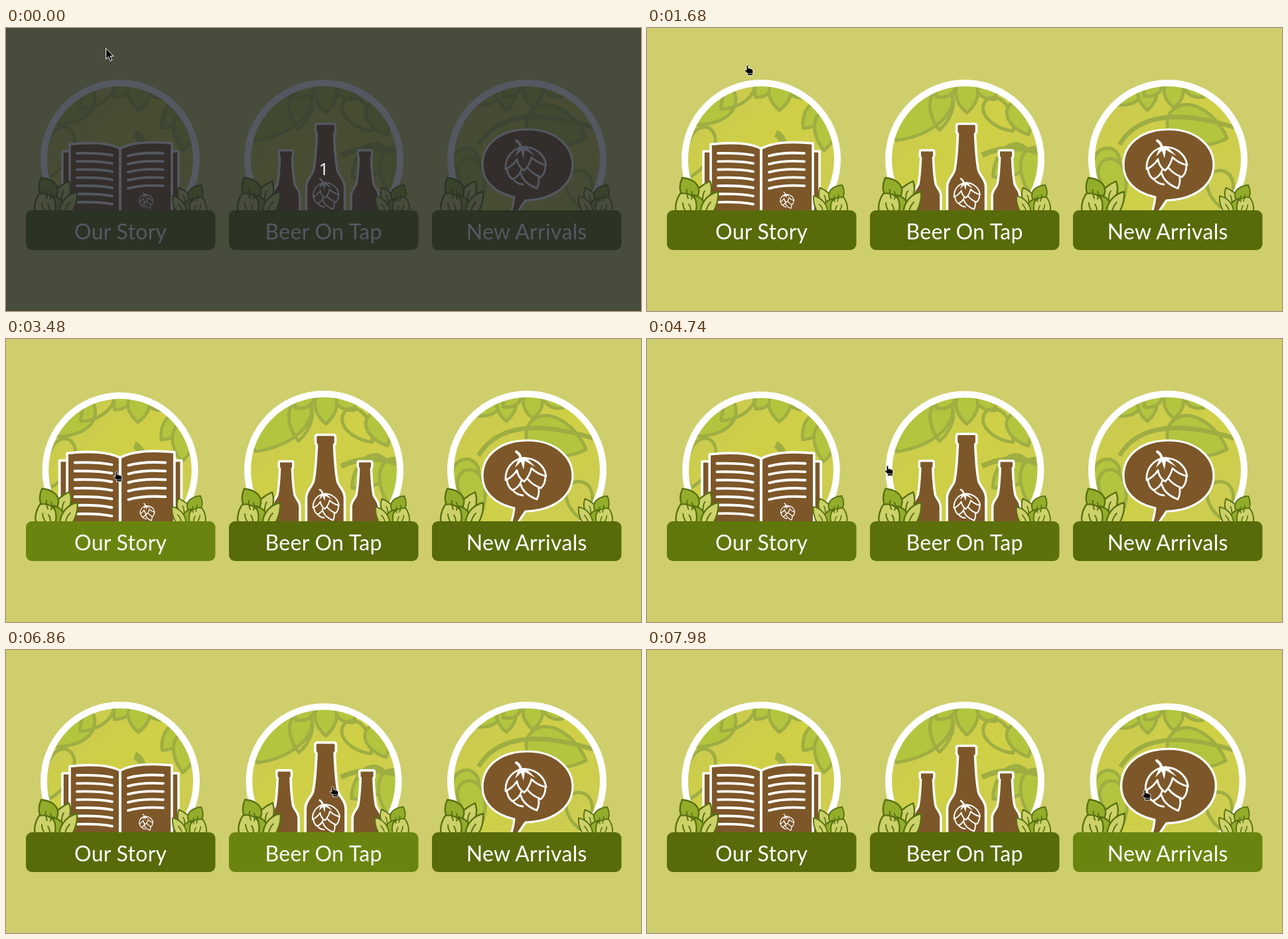
These frames come from a looping animation (957x427 px, 8000 ms). An HTML page:

```html
<!DOCTYPE html>
<html lang="en">
<head>
<meta charset="utf-8">
<title>Brewery cards</title>
<style>
@property --h { syntax: "<number>"; inherits: true; initial-value: 0; }
html, body { margin: 0; width: 100%; height: 100%; overflow: hidden; background: #cfce6c; }
svg { display: block; width: 100vw; height: 100vh; }

.card { --h: 0; animation: 8s linear infinite; }
#c0 { animation-name: first; }
#c1 { animation-name: second; }
#c2 { animation-name: third; }
.ring { transform: scale(calc(1 - .0208 * var(--h))); }
.hops { transform: scale(calc(1 - .01 * var(--h))); }
.icon { transform: scale(calc(1 + .05 * var(--h))); }
.button { fill: color-mix(in srgb, #6a850f calc(var(--h) * 100%), #576b0a); }
.label { font: 32px Lato, "Open Sans", sans-serif; letter-spacing: .3px; fill: #fff; text-anchor: middle; }
.count { font: 26px "Open Sans", "Noto Sans", sans-serif; fill: #fff; text-anchor: middle; }
.brown { fill: #7d5729; stroke: #fff; stroke-width: 3.6; stroke-linejoin: round; }
.line { fill: none; stroke: #fff; stroke-linecap: round; stroke-linejoin: round; }
.faint { fill: none; stroke: #9fae42; stroke-width: 5; stroke-linejoin: round; }
.faint .fill { fill: #b3c53e; }
.leaf { stroke: #587112; stroke-width: 2.4; stroke-linejoin: round; }
.vein { fill: none; stroke: #587112; stroke-width: 2; stroke-linecap: round; }
.light { fill: #cdd169; }
.mid { fill: #93ad2b; }

.intro { animation: intro 8s step-end infinite; }
.arrow { animation: arrow 8s step-end infinite; }
.hand { animation: hand 8s step-end infinite; }
.cursor { animation: move 8s step-end infinite; }

@keyframes first {
  0%, 22.5% { --h: 0; animation-timing-function: ease; }
  29.25% { --h: 1; }
  57.25% { --h: 1; animation-timing-function: ease; }
  63.75%, 100% { --h: 0; }
}
@keyframes second {
  0%, 58.125% { --h: 0; animation-timing-function: ease; }
  64.5% { --h: 1; }
  91% { --h: 1; animation-timing-function: ease; }
  97.5%, 100% { --h: 0; }
}
@keyframes third {
  0%, 91.75% { --h: 0; animation-timing-function: ease; }
  98.25%, 100% { --h: 1; }
}
@keyframes intro { 0% { visibility: visible; } .25%, 100% { visibility: hidden; } }
@keyframes arrow { 0% { visibility: visible; } 19.5%, 100% { visibility: hidden; } }
@keyframes hand { 0% { visibility: hidden; } 19.5%, 100% { visibility: visible; } }
@keyframes move {
  0% { transform: translate(150px, 30px); }
  14% { transform: translate(150px, 33px); }
  17.75% { transform: translate(150px, 55px); }
  19.5% { transform: translate(146px, 55px); }
  22.5% { transform: translate(146px, 72px); }
  26% { transform: translate(148px, 116px); }
  29.5% { transform: translate(150px, 162px); }
  33% { transform: translate(160px, 189px); }
  36.5% { transform: translate(158px, 200px); }
  40% { transform: translate(161px, 200px); }
  43.5% { transform: translate(161px, 199px); }
  47% { transform: translate(205px, 192px); }
  50.5% { transform: translate(249px, 190px); }
  54% { transform: translate(295px, 190px); }
  57.75% { transform: translate(357px, 190px); }
  61% { transform: translate(397px, 193px); }
  64.75% { transform: translate(409px, 197px); }
  68.25% { transform: translate(421px, 200px); }
  71.75% { transform: translate(422px, 202px); }
  85.75% { transform: translate(487px, 205px); }
  89.25% { transform: translate(555px, 206px); }
  91% { transform: translate(650px, 207px); }
  94.5% { transform: translate(705px, 209px); }
  98% { transform: translate(740px, 210px); }
  99.75%, 100% { transform: translate(745px, 210px); }
}
</style>
</head>
<body>
<svg viewBox="0 0 957 427" preserveAspectRatio="none">
  <defs>
    <clipPath id="top"><path d="M0,0H957V276H0Z"/></clipPath>
    <linearGradient id="field" x1="0" y1="0" x2=".7" y2=".8">
      <stop offset="0" stop-color="#c8c955"/>
      <stop offset=".6" stop-color="#cfd045"/>
      <stop offset="1" stop-color="#cdcd50"/>
    </linearGradient>

    <g id="hop" class="line">
      <path stroke-width="4" d="M-14,-36Q-8,-32 -7,-26"/>
      <path fill="#fff" stroke="none" d="M-10,-27L-16,-12L-7,-21L-3,-9L-1,-22L15,-13L0,-28Z"/>
      <path d="M-7,-26C-21,-22 -31,-10 -30,7Q-19,2 -13,-8
        M-7,-26C12,-29 29,-16 31,1Q18,-2 9,-11
        M-13,-8Q-11,4 -2,9Q6,1 9,-11
        M-28,7Q-27,17 -20,22Q-9,18 -6,7
        M30,1Q30,13 23,19Q10,14 3,5
        M-19,22Q-14,29 -4,30
        M-7,14Q-3,28 17,36Q22,26 19,17"/>
    </g>

    <g id="bunch">
      <path class="leaf light" d="M95,231C99,242 98,252 90,262H76C72,254 74,246 79,241Q86,235 95,231Z"/>
      <path class="leaf mid" d="M53,226C67,227 80,235 78,248C77,257 68,262 58,258C48,250 48,237 53,226Z"/>
      <path class="leaf light" d="M50,250C63,247 75,256 77,268L76,282H46L43,273Q43,260 50,250Z"/>
      <path class="leaf mid" d="M70,252Q86,256 88,270L84,282H72Q78,266 70,252Z"/>
      <path class="leaf light" d="M107,247C108,260 104,272 97,282H81C79,266 90,251 107,247Z"/>
      <path class="vein" d="M62,257Q59,250 60,244M67,258Q69,252 67,247M84,258Q84,250 87,246M58,276Q54,270 54,264M66,276Q66,270 63,266M89,276Q91,268 96,263"/>
    </g>

    <path id="bottle" d="M-12,144.5H12Q15,144.5 15,148V157L13,160C14,185 15,200 18,215C21,224 29,228 29,240V284H-29V240C-29,228 -21,224 -18,215C-15,200 -14,185 -13,160L-15,157V148Q-15,144.5 -12,144.5Z"/>
  </defs>

  <g id="cards"></g>

  <g class="intro">
    <path d="M0,0H957V427H0Z" fill="rgb(27,33,45)" fill-opacity=".75"/>
    <text class="count" x="479" y="222">1</text>
  </g>

  <g class="cursor">
    <path class="arrow" d="M.6,.8V17L4.4,13.4L7.2,19.6L9.9,18.4L7.2,12.4H12Z" fill="#000" stroke="#fff"/>
    <g class="hand">
      <path d="M4,2Q5.4,.2 6.8,2V6Q8.6,5.2 9.6,6.4Q11.4,5.8 12,7.2Q14,7.2 13.8,9.2V13L12.8,16.4H5.4V13.4L1,9.4Q.8,7.4 3,8L4,8.8Z" fill="#000" stroke="#fff" stroke-width=".9"/>
      <path d="M5.6,13.6H12.8" fill="none" stroke="#fff" stroke-width=".7"/>
    </g>
  </g>
</svg>

<script>
const useHop = (x, y, s, w) =>
  `<use href="#hop" transform="translate(${x} ${y}) scale(${s})" stroke-width="${w}"/>`;

// A pointed hop bract hanging from (x, y), turned by deg
const leaf = (x, y, len, w, deg, cls = "fill") =>
  `<path class="${cls}" transform="translate(${x} ${y}) rotate(${deg})"
    d="M0,0C${-w * 1.4},${len * .05} ${-w * 1.2},${len * .65} 0,${len}C${w * 1.2},${len * .65} ${w * 1.4},${len * .05} 0,0"/>`;

function book() {
  let lines = "";
  for (let i = 0; i < 7; i++) {
    const y = 189 + i * 12.3;
    lines += `M107,${y}Q140,${y - 1} 160,${y + 3}`;
    if (i < 5) lines += `M184,${y + 4}Q205,${y - 2} 237,${y}`;
  }
  return `<path class="brown" d="M85,186H260V284H85Z"/>
    <path class="brown" d="M96,175.5C125,172 155,173 172,182C190,172 220,171 250,174V284H96Z"/>
    <path class="line" stroke-width="4" d="M172,183V280"/>
    <path class="line" stroke-width="3.8" d="${lines}"/>` + useHop(211, 260, .34, 3.6);
}

function bottles() {
  const small = x => `<use href="#bottle" class="brown" style="stroke-width:4.8"
    transform="translate(${x} 80.5) scale(.72)"/>`;
  return small(422) + small(541) +
    `<use href="#bottle" class="brown" x="481.5"/>` + useHop(482, 250.5, .64, 3);
}

const bubble = () => `<path class="brown" style="stroke-width:3.2"
  d="M786,153C830,153 854,180 854,206C854,238 824,259 783,260Q776,270 767,284H759Q765,268 766,255C736,249 718,230 718,207C718,175 745,153 786,153Z"/>` +
  useHop(783, 206, 1, 2.8);

const cards = [
  { label: "Our Story", cx: 172, bx: 30, pivot: 240, icon: book,
    back: leaf(112, 70, 95, 48, 38) + leaf(158, 76, 66, 18, 45, "") +
      leaf(92, 150, 80, 20, 20, "") +
      leaf(184, 80, 32, 12, 40) + leaf(217, 80, 34, 13, -40) + leaf(201, 80, 44, 17, 2) +
      leaf(265, 116, 46, 15, 40) + leaf(290, 118, 60, 20, -10) + leaf(272, 125, 60, 18, 5) +
      `<path stroke-width="11" d="M194,159Q207,164 207,190"/>` },
  { label: "Beer On Tap", cx: 479, bx: 336, pivot: 242, icon: bottles,
    back: leaf(425, 60, 120, 56, 24) + leaf(446, 92, 62, 18, 5, "") +
      leaf(460, 80, 34, 13, 45) + leaf(502, 80, 36, 14, -40) + leaf(482, 80, 48, 17, 0) +
      leaf(512, 108, 62, 18, -40, "") + leaf(552, 112, 54, 18, -25) +
      leaf(572, 182, 66, 22, 50) + leaf(585, 180, 72, 20, 5) +
      `<path stroke-width="8" d="M505,192Q545,172 596,190"/>` },
  { label: "New Arrivals", cx: 785, bx: 642, pivot: 231, icon: bubble,
    back: leaf(742, 86, 46, 16, 50) + leaf(754, 82, 42, 15, 0) +
      leaf(772, 80, 32, 12, 45) + leaf(815, 80, 34, 13, -45) + leaf(794, 80, 40, 15, 0) +
      leaf(785, 134, 95, 30, -70) +
      leaf(700, 182, 62, 20, 20) + leaf(692, 198, 70, 20, -20) + leaf(860, 215, 60, 20, -10, "") +
      `<path stroke-width="7" d="M712,176C740,130 800,122 892,152"/>` },
];

document.getElementById("cards").innerHTML = cards.map((c, i) => `
  <g id="c${i}" class="card">
    <g clip-path="url(#top)">
      <g class="ring" style="transform-origin:${c.cx}px 198px">
        <clipPath id="disc${i}"><circle cx="${c.cx}" cy="198" r="111"/></clipPath>
        <circle cx="${c.cx}" cy="198" r="111" fill="url(#field)"/>
        <g class="faint" clip-path="url(#disc${i})">${c.back}</g>
        <circle cx="${c.cx}" cy="198" r="115" fill="none" stroke="#fff" stroke-width="10"/>
      </g>
      <g class="icon" style="transform-origin:${c.cx + .5}px ${c.pivot}px">${c.icon()}</g>
      <g class="hops" style="transform-origin:${c.cx}px 198px">
        <use href="#bunch" x="${c.bx - 30}"/>
        <use href="#bunch" transform="translate(${c.bx + 306.6} 60.7) scale(-.8 .78)"/>
      </g>
    </g>
    <rect class="button" x="${c.bx}" y="275" width="285.5" height="60" rx="9"/>
    <text class="label" x="${c.bx + 142.7}" y="318.5">${c.label}</text>
  </g>`).join("");
</script>
</body>
</html>
```
